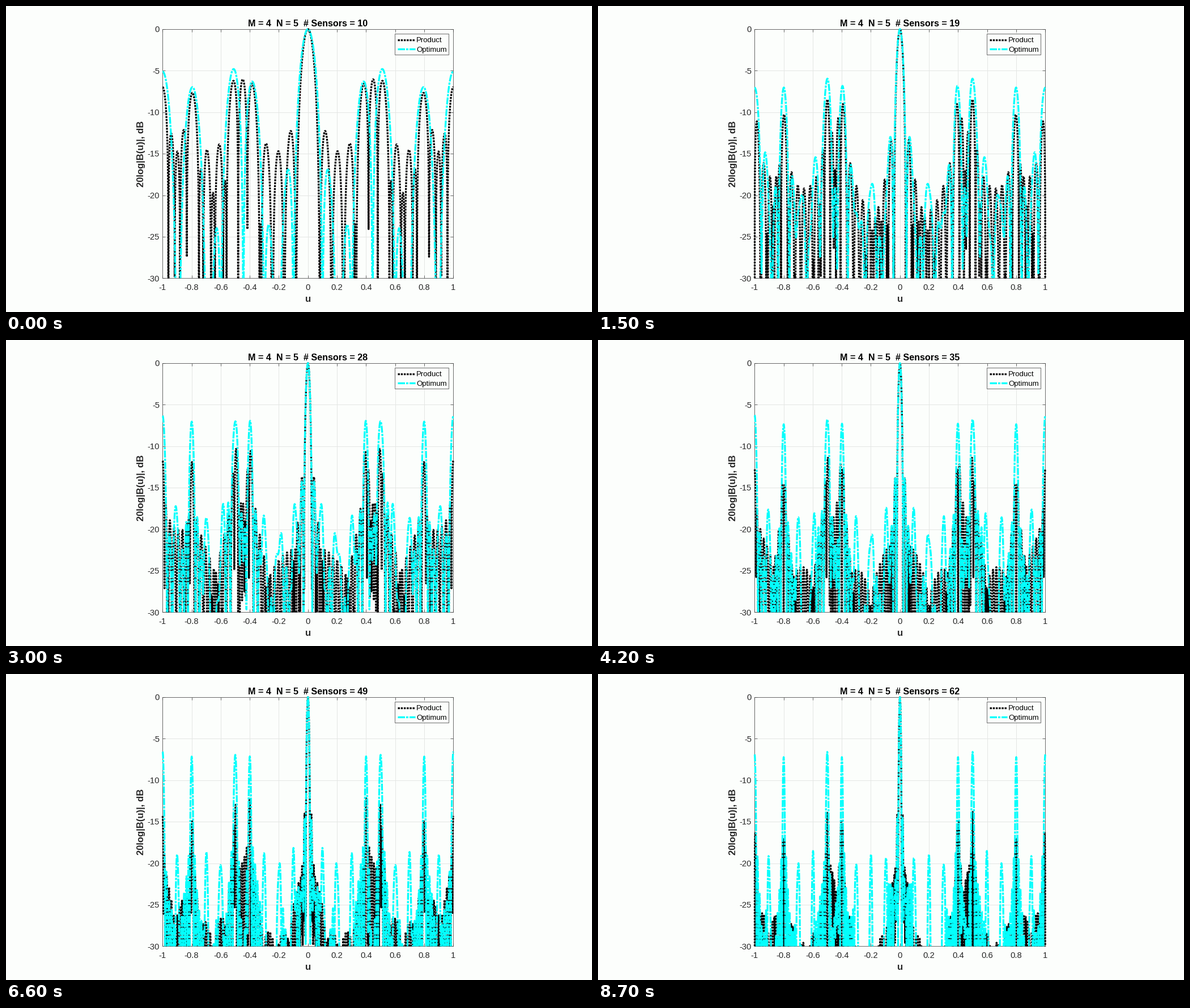
A matplotlib script for the animation above (9000 ms loop, 1034x541 px).

```python
import numpy as np
import matplotlib.pyplot as plt
from matplotlib.animation import FuncAnimation
from matplotlib.lines import Line2D
from matplotlib.patches import Rectangle

W, H = 1034, 541
PX = 0.72  # points per pixel at 100 dpi
LEFT, RIGHT, TOP, BOTTOM = 276.3, 789.3, 40.9, 481.3
PAPER, INK, BLACK, CYAN = "#fcfefc", "#262626", "#040204", "#04fefc"
EDGE = "#484848"
M, N = 4, 5
FLOOR = -30
STEP = 0.001
U = np.arange(-1000, 1001) * STEP

plt.rcParams.update({
    "font.family": "Liberation Sans",
    "lines.scale_dashes": False,
    "lines.dash_capstyle": "butt",
    "path.simplify": False,
})

PRODUCT = dict(color=BLACK, lw=3.3 * PX, dashes=(3.4 * PX, 1.8 * PX))
OPTIMUM = dict(color=CYAN, lw=3.3 * PX,
               dashes=(12.5 * PX, 2 * PX, 4 * PX, 2 * PX))


def pattern(positions):
    """Normalised beam pattern of equally weighted sensors."""
    phase = np.pi * np.outer(positions, U)
    return np.abs(np.exp(1j * phase).mean(axis=0))


def decibels(power):
    return 10 * np.log10(np.maximum(power, 1e-16))


def visible(y):
    """Cut a curve at the floor and leave gaps below it."""
    below = y < FLOOR
    i = np.flatnonzero(below[1:] != below[:-1])
    part = (FLOOR - y[i]) / (y[i + 1] - y[i])
    x = np.insert(U, i + 1, U[i] + part * STEP)
    y = np.insert(y, i + 1, FLOOR)
    return x, np.where(y < FLOOR, np.nan, y)


def text(x, y, s, size, color=INK, **kw):
    """Text with its baseline at a pixel position from the top left."""
    return fig.text(x / W, 1 - y / H, s, fontsize=size * PX, color=color,
                    va="baseline", **kw)


def styled(x, y, style, **kw):
    style = dict(style)
    dashes = style.pop("dashes")
    line = Line2D(x, y, **style, **kw)
    line.set_dashes(dashes)
    return line


fig = plt.figure(figsize=(W / 100, H / 100), dpi=100, facecolor=PAPER)
ax = fig.add_axes([LEFT / W, 1 - BOTTOM / H,
                   (RIGHT - LEFT) / W, (BOTTOM - TOP) / H], facecolor=PAPER)
ax.set_xlim(-1, 1)
ax.set_ylim(FLOOR, 0)
xticks = np.arange(-5, 6) / 5
yticks = np.arange(FLOOR, 1, 5)
ax.set_xticks(xticks)
ax.set_yticks(yticks)
ax.set_axisbelow(True)
ax.grid(color="#e4e6e4", lw=PX)
ax.tick_params(direction="in", length=5 * PX, width=0.8 * PX, color=EDGE,
               top=True, right=True, labelbottom=False, labelleft=False)
for spine in ax.spines.values():
    spine.set(color=EDGE, linewidth=0.8 * PX, zorder=1.5)

for v in xticks:
    text(LEFT + (v + 1) / 2 * (RIGHT - LEFT), 502, f"{v:g}", 14.7, ha="center")
for v in yticks:
    text(271, TOP + v / FLOOR * (BOTTOM - TOP) + 5.4, f"{v}", 14.7, ha="right")
text(533, 523.2, "u", 16.6, weight="bold", ha="center")
text(243.3, 261.5, "20log|B(u)|, dB", 16.6, weight="bold", ha="center",
     rotation=90, rotation_mode="anchor")
title = text(533, 35.6, "", 16.1, "black", weight="bold", ha="center")

product = ax.add_line(styled([], [], PRODUCT, zorder=3, clip_on=False))
optimum = ax.add_line(styled([], [], OPTIMUM, zorder=4, clip_on=False))

# Legend, laid out in stage pixels
key = fig.add_axes([0, 0, 1, 1], zorder=2)
key.set_xlim(0, W)
key.set_ylim(H, 0)
key.axis("off")
key.add_patch(Rectangle((686.3, 48.7), 94.5, 37, facecolor=PAPER,
                        edgecolor=EDGE, lw=0.8 * PX))
for name, style, y in (("Product", PRODUCT, 59.5), ("Optimum", OPTIMUM, 76)):
    key.add_line(styled([690.5, 721.5], [y, y], style, zorder=3))
    key.text(724, y + 4.7, name, fontsize=13.2 * PX, color="black",
             va="baseline")


def draw(step):
    wide = N * np.arange(5 + step)
    dense = M * np.arange(6 + step)
    union = np.union1d(wide, dense)
    product.set_data(*visible(decibels(pattern(wide) * pattern(dense))))
    optimum.set_data(*visible(decibels(pattern(union) ** 2)))
    shared = -(-len(wide) // N)
    sensors = len(wide) + len(dense) - shared
    title.set_text(f"M = {M}  N = {N}  # Sensors = {sensors}")
    return product, optimum, title


anim = FuncAnimation(fig, draw, frames=30, interval=300, repeat=True,
                     repeat_delay=0, blit=False)
plt.show()
```
